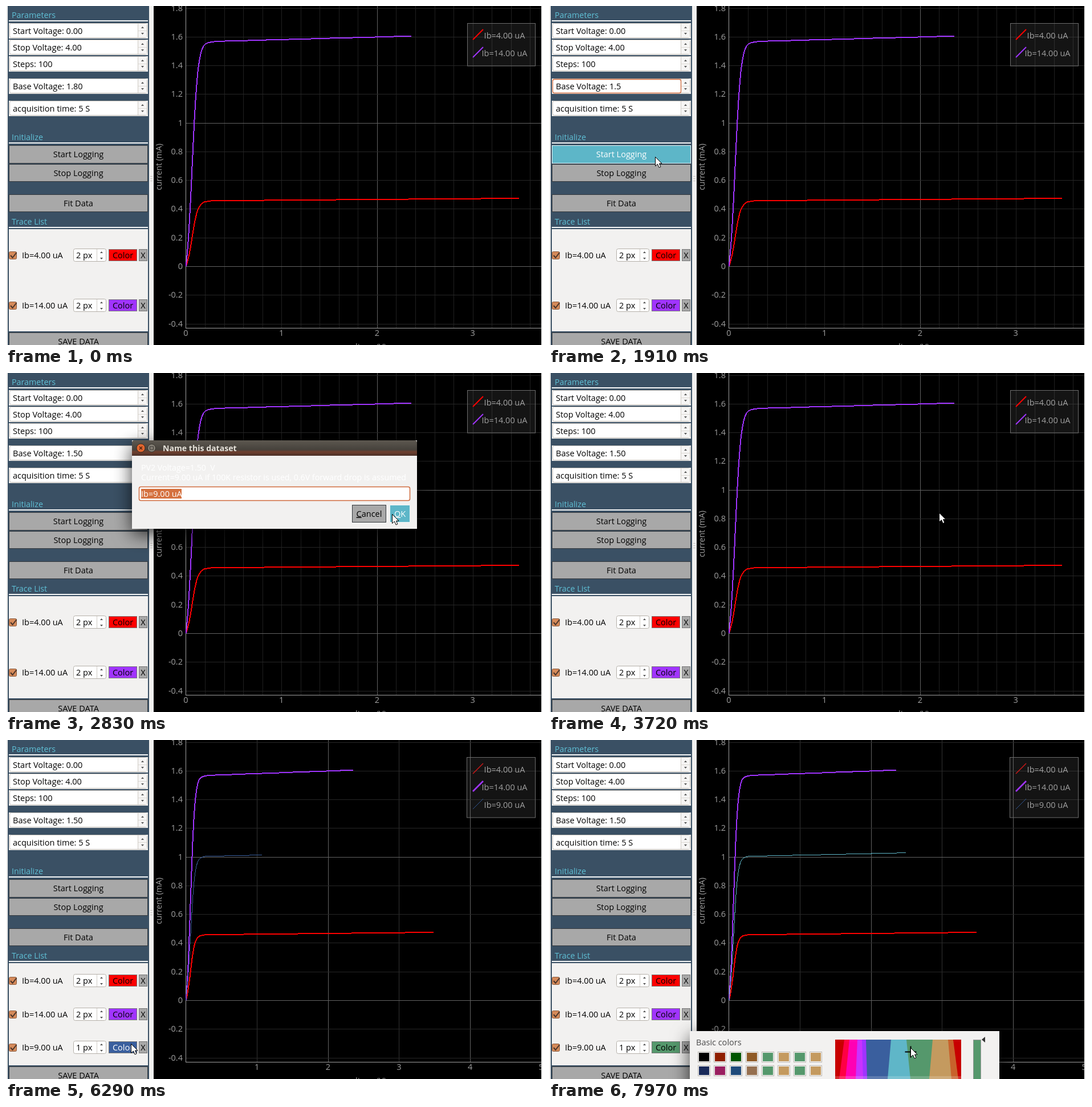
An HTML page that plays this animation: 942x594 px, repeating every 8 s.

```html
<!DOCTYPE html>
<html lang="en">
<head>
<meta charset="utf-8">
<title>Transistor curve logger</title>
<style>
  html, body { margin: 0; width: 100%; height: 100%; overflow: hidden; background: #000; }
  svg { display: block; width: 942px; height: 594px; font: 14.5px "Open Sans", sans-serif; }
  text { white-space: pre; }
  .mid { text-anchor: middle; }
  .end { text-anchor: end; }
  .head { fill: #5fc0d6; font-size: 14.3px; }
  .axis { fill: #a0a0a0; }
  .small { font-size: 14.2px; }
  .crisp { shape-rendering: crispEdges; }
  .btn rect { fill: #a8a8a8; stroke: #35393d; }
  .btn.hot rect { fill: #5db6c8; stroke: #e8f4f6; }
  .btn.hot text, .swatch.hot text { fill: #fff; }
</style>
</head>
<body>
<svg id="stage" viewBox="0 0 942 594">
  <defs>
    <linearGradient id="bar" x2="0" y2="1">
      <stop offset="0" stop-color="#5d5850"/><stop offset=".6" stop-color="#46423c"/>
      <stop offset=".75" stop-color="#70402f"/><stop offset="1" stop-color="#4a3028"/>
    </linearGradient>
    <filter id="shadow" x="-20%" y="-60%" width="140%" height="240%">
      <feDropShadow dx="0" dy="10" stdDeviation="16" flood-color="#000" flood-opacity=".75"/>
    </filter>
    <clipPath id="plotClip"><path d="M259 0H939V594H259z"/></clipPath>
    <clipPath id="pickClip"><path d="M502 525H723V594H502z"/></clipPath>
  </defs>
</svg>
<script>
const LOOP = 8000, Y0 = 456, YS = 251.3, X0 = 315.5;
const RED = '#ff0000', PURPLE = '#a034ff', BLUE = '#3a5f9e', CYAN = '#5fb6c8',
      GREEN = '#55986c', TAN = '#c49a5f', PALE = '#f2f1f0';
const $ = id => document.getElementById(id);

// --- drawing helpers -------------------------------------------------
const rect = (x, y, w, h, fill, more = '') =>
  `<rect x="${x}" y="${y}" width="${w}" height="${h}" fill="${fill}" ${more}/>`;
const text = (x, y, s, more = '') => `<text x="${x}" y="${y}" ${more}>${s}</text>`;
const line = (x1, y1, x2, y2, c, w = 1) =>
  `<path class="crisp" d="M${x1} ${y1}L${x2} ${y2}" stroke="${c}" stroke-width="${w}"/>`;
const group = (id, body, more = '') => `<g id="${id}" ${more}>${body}</g>`;
const button = (id, x, y, w, h, s) =>
  group(id, rect(x + .5, y + .5, w - 1, h - 1, '') +
    text(x + w / 2, y + h / 2 + 5, s, 'class="mid"'), 'class="btn"');

function arrows(x, y, gap) {
  return `<path d="M${x - 2.5} ${y - gap + 1}l2.5 -3l2.5 3zM${x - 2.5} ${y + gap - 1}l2.5 3l2.5 -3z" fill="#555"/>`;
}
function field(y, label, id = '') {
  return rect(5, y, 244, 27, PALE) +
    rect(6.5, y + .5, 241, 25, '#fff', 'rx="3" stroke="#c4bfb8"') +
    rect(232, y + 1, 15, 24, '#f6f5f4') + line(231.5, y + 1, 231.5, y + 25, '#cfcbc5') +
    line(232, y + 13.5, 247, y + 13.5, '#dedbd6') + arrows(239.5, y + 13, 5) +
    text(12, y + 19, label, id && `id="${id}"`);
}
function heading(y, s) {
  return text(10, y, s, 'class="head"') + rect(5, y + 4, 244, 2, '#f4f6f7');
}
function traceRow(y, name, px, color, id = '') {
  return rect(5.5, y - 6.5, 13, 13, '#d58a5a', 'rx="2" stroke="#8a5a3c"') +
    `<path d="M8 ${y}l3.5 4l7 -9" fill="none" stroke="#4a352a" stroke-width="2"/>` +
    text(28, y + 5, name) +
    rect(118.5, y - 11.5, 57, 22, '#fff', 'rx="3" stroke="#b5b0a9"') +
    line(159.5, y - 11, 159.5, y + 10, '#cfcbc5') + arrows(167.5, y, 5) + text(123, y + 5, px + ' px') +
    group(id, rect(180.5, y - 10.5, 49, 20, color, 'stroke="#777"') +
      text(205, y + 5, 'Color', 'class="mid"'), 'class="swatch"') +
    rect(233.5, y - 10.5, 14, 20, '#a8a8a8', 'stroke="#777"') + text(240.5, y + 5, 'X', 'class="mid"');
}

// --- transistor curves ----------------------------------------------
function current(v, sat, slope) {
  const e = Math.exp(-v / .03);
  return (sat + slope * v) * (1 - e) / (1 + 9 * e);
}
// The load takes 1 V per mA, so solve v + i(v) = supply at each step.
function curve(sat, slope, supply, scale) {
  const pts = [];
  for (let n = 0; n <= Math.round(supply / .04); n++) {
    let lo = 0, hi = n * .04;
    for (let k = 0; k < 22; k++) {
      const m = (lo + hi) / 2;
      if (m + current(m, sat, slope) > n * .04) hi = m; else lo = m;
    }
    const i = Math.round(current(lo, sat, slope) * 250) / 250;
    pts.push((X0 + lo * scale).toFixed(1) + ',' + (Y0 - i * YS).toFixed(1));
  }
  return pts.join(' ');
}
const trace = (pts, color, w, id = '') =>
  `<polyline class="crisp" id="${id}" points="${pts}" fill="none" stroke="${color}" stroke-width="${w}"/>`;

function plot(id, scale, step, ticks) {
  let s = '';
  for (let k = 1; X0 + k * step * scale < 939; k++) {
    const v = k * step, x = Math.round(X0 + v * scale) + .5;
    const major = Math.abs(v % 2) < .01 || v % 2 > 1.99;
    s += line(x, 0, x, 564, major ? '#626262' : step < 1 ? '#202020' : '#333');
  }
  for (let k = -2; k <= 9; k++) {
    const y = Math.round(Y0 - k * .2 * YS) + .5;
    s += line(316, y, 939, y, k % 5 ? '#262626' : '#626262');
    s += text(310, y + 4.5, +(k * .2).toFixed(1), 'class="axis end"');
  }
  s += line(315.5, 0, 315.5, 565, '#a0a0a0') + line(315, 564.5, 939, 564.5, '#a0a0a0');
  for (const v of ticks) s += text(X0 + v * scale, 578, v, 'class="axis mid"');
  s += trace(curve(.4538, .0053, 3.96, scale), RED, 2) + trace(curve(1.5625, .018, 3.96, scale), PURPLE, 2);
  return group(id, s);
}
function legend(x, rows) {
  return rect(x, 30.5, 928.5 - x, 12.5 + rows.length * 31, '#646464', 'fill-opacity=".2" stroke="#6c6c6c"') +
    rows.map(([name, color, w], k) =>
      `<path d="M819 ${59 + k * 31}l18 -18" stroke="${color}" stroke-width="${w}"/>` +
      text(874.5, 57 + k * 31, name, 'class="axis mid"')).join('');
}

const names = ['Ib=4.00 uA', 'Ib=14.00 uA', 'Ib=9.00 uA'];

const panel = rect(0, 0, 942, 594, PALE) + rect(3, 0, 248, 594, '#3a5064') +
  heading(21, 'Parameters') + field(30, 'Start Voltage: 0.00') + field(59, 'Stop Voltage: 4.00') +
  field(88, 'Steps: 100') + field(127, '', 'base') + field(166, 'acquisition time: 5 S') +
  rect(6.5, 128.5, 225, 24, 'none', 'id="focus" rx="3" stroke="#cf6a3c" stroke-width="1.3"') +
  group('caret', line(134.5, 132, 134.5, 149, '#000')) +
  heading(235, 'Initialize') + button('start', 5, 244, 244, 32, 'Start Logging') +
  button('stop', 5, 277, 244, 31, 'Stop Logging') + button('fit', 5, 330, 244, 31, 'Fit Data') +
  heading(383, 'Trace List') + rect(5, 391, 244, 179, PALE) +
  group('listA', traceRow(437, names[0], 2, RED) + traceRow(525, names[1], 2, PURPLE)) +
  group('listB', traceRow(422, names[0], 2, RED) + traceRow(481, names[1], 2, PURPLE) +
    traceRow(539, names[2], 1, BLUE, 'pick')) +
  button('save', 5, 572, 244, 32, 'SAVE DATA') +
  [0, 1, 2].map(k => rect(253, 298 + k * 4, 4, 1, '#c8c4bf')).join('');

const graph = rect(259, 0, 680, 594, '#000') +
  plot('plotA', 167.7, .2, [0, 1, 2, 3]) + plot('plotB', 124.65, 1, [1, 2, 3, 4, 5]) +
  trace('', BLUE, 1, 'live') +
  group('legendA', legend(809.5, [[names[0], RED, 2], [names[1], PURPLE, 2]])) +
  group('legendB', legend(808.5, [[names[0], '#d01818', 1.4], [names[1], PURPLE, 2.6], [names[2], '#2f5590', 1]])) +
  text(0, 0, 'current (mA)', 'class="axis mid" font-size="14" transform="translate(273 282) rotate(-90)"') +
  text(632, 602, 'voltage (V)', 'class="axis mid"') +
  rect(259.5, 591.5, 12, 12, '#222', 'id="auto" rx="3" stroke="#999"');

const nameBox = rect(221, 118, 500, 155, PALE, 'filter="url(#shadow)"') +
  `<path d="M221 145V122q0 -4 4 -4H717q4 0 4 4V145z" fill="url(#bar)"/>` +
  `<circle cx="236.5" cy="131.5" r="7.5" fill="#e2662f" stroke="#3a2a20"/>` +
  `<path d="M234 129l5 5m0 -5l-5 5" stroke="#4a2413" stroke-width="1.5"/>` +
  `<circle cx="255.5" cy="131.5" r="7" fill="#837e74" stroke="#33302b"/>` +
  rect(252.5, 129, 6, 5, 'none', 'stroke="#3a3732"') +
  text(275, 137, 'Name this dataset', 'fill="#e6e2da" font-weight="700" font-size="14.1"') +
  text(237, 171, 'PV2 Voltage=1.50  V', 'class="small" fill="#fff"') +
  text(237, 188, 'Current=9.00 uA if 100K resistor is used, 0.6V forward drop is assumed', 'class="small" fill="#fff"') +
  rect(233.5, 199.5, 475, 24, '#fff', 'id="entry" rx="3" stroke-width="1.5"') +
  rect(237, 203, 71, 17, '#d5713f') + text(237, 217, names[2], 'fill="#fff"') +
  group('entryCaret', line(308.5, 203, 308.5, 220, '#000')) +
  button('cancel', 607, 231, 60, 31, '<tspan text-decoration="underline">C</tspan>ancel') +
  button('ok', 673, 231, 36, 31, '<tspan text-decoration="underline">O</tspan>K');

// Hue stripes: left edge at the top, left edge at the bottom, colour.
const stripes = [[502, 502, '#c80000'], [518, 509, '#ff0044'], [527, 520, '#ff00b4'], [541, 538, '#c832ff'],
  [549, 551, PURPLE], [556, 558, BLUE], [600, 594, CYAN], [627, 634, GREEN], [673, 667, TAN],
  [700, 706, '#c8622c'], [709, 718, '#c80000']];
const swatches = ['#000', '#8f1f00', '#005500', '#8f5a26', GREEN, TAN, GREEN, TAN,
  '#1a2a5a', '#9a1f60', '#1f4a7a', '#967050', GREEN, TAN, GREEN, TAN];
const colorBox = rect(247, 510, 543, 200, PALE, 'filter="url(#shadow)"') +
  text(258, 535, 'Basic colors', 'fill="#4a4a4a"') +
  swatches.map((c, k) => {
    const x = 262 + k % 8 * 28, y = 547 + (k >> 3) * 24;
    return rect(x - .5, y - .5, 21, 18, '#fff', 'stroke="#b8b4ae"') + rect(x + 1, y + 1, 18, 15, c);
  }).join('') +
  `<g clip-path="url(#pickClip)">` +
  stripes.map(([a, b, c]) => `<path d="M${a} 525H723V594H${b}z" fill="${c}"/>`).join('') +
  rect(502, 589, 221, 5, '#fff', 'opacity=".18"') +
  `<path id="cross" d="M-10 0H10M0 -10V10" stroke="#000" stroke-width="2"/></g>` +
  rect(744.5, 525.5, 13, 80, BLUE, 'id="value" stroke="#999"') +
  `<path d="M759 525l6 -5v10z" fill="#333"/>`;

$('stage').insertAdjacentHTML('beforeend', panel +
  `<g clip-path="url(#plotClip)">${graph}</g>` + group('nameBox', nameBox) + group('colorBox', colorBox) +
  `<path id="mouse" d="M0 0V16L4 12.5L6.6 18.5L9.4 17.3L7 11.6H11.6z" fill="#fff" stroke="#000"/>`);
$('ok').classList.add('hot');

// --- timeline --------------------------------------------------------
const path = [[450, 134, 132], [550, 224, 166], [1440, 224, 166], [1660, 214, 300], [1860, 186.5, 264.5],
  [2450, 186.5, 264.5], [2800, 677.5, 247.5], [2850, 677.5, 247.5], [3000, 684.5, 245], [4000, 684.5, 245],
  [4250, 695, 330], [4720, 560, 600], [5400, 394, 600], [5860, 306, 572], [6250, 219.5, 532.5],
  [6760, 219.5, 532.5], [7100, 400, 562], [7500, 562, 548], [7970, 634.5, 539.5]];

function mouseAt(t) {
  let k = 0;
  while (k < path.length - 2 && t > path[k + 1][0]) k++;
  const [a, ax, ay] = path[k], [b, bx, by] = path[k + 1];
  const p = Math.min(1, Math.max(0, (t - a) / (b - a)));
  return [ax + (bx - ax) * p, ay + (by - ay) * p];
}
function pickedAt(t) {
  if (t < 7550) return BLUE;
  const [x, y] = mouseAt(t), p = (y + 8 - 525) / 69;
  return stripes.reduce((c, [a, b, col]) => x >= a + (b - a) * p ? col : c, BLUE);
}
const show = (id, on) => $(id).style.display = on ? '' : 'none';
const fade = (id, p) => { show(id, p > 0); $(id).style.opacity = Math.min(1, p); };
const hot = (id, on) => $(id).classList.toggle('hot', on);

let shown = '';
function render(t) {
  const [x, y] = mouseAt(t), second = t >= 3790;
  const over = (x1, y1, x2, y2) => t >= 450 && x >= x1 && x < x2 && y >= y1 && y < y2;

  $('base').textContent = 'Base Voltage: ' + (t < 940 ? '1.80' : t < 2100 ? '1.5' : '1.50');
  show('focus', t >= 60 && t < 2100);
  show('caret', t >= 110 && t < 500);
  hot('start', t < 2330 && over(5, 244, 249, 276));
  hot('stop', t < 2330 && over(5, 277, 249, 308));
  hot('pick', t < 6730 && over(180, 528, 230, 549));

  for (const id of ['plot', 'legend', 'list']) {
    show(id + 'A', !second);
    show(id + 'B', second);
  }
  show('auto', second && t < 6000);

  fade('nameBox', t < 3720 ? (t - 2330) / 150 : 0);
  show('entryCaret', t >= 3220 && t < 3560);
  $('entry').setAttribute('stroke', t < 3560 ? '#cf6a3c' : '#b5b0a9');

  const clock = t > 4870 && t < 5070 ? 4870 : t;
  const supply = second ? Math.max(0, Math.floor((clock - 3840) * .000855 / .04 + .01) * .04) : 0;
  const pts = curve(1, .011, supply, 124.65);
  if (pts !== shown) $('live').setAttribute('points', shown = pts);
  $('live').setAttribute('stroke', pickedAt(t - 120));

  fade('colorBox', (t - 6730) / 180);
  const color = pickedAt(t);
  $('pick').firstChild.setAttribute('fill', color);
  $('value').setAttribute('fill', color);
  show('cross', t >= 7550);
  $('cross').setAttribute('transform', `translate(${x} ${y + 7})`);

  show('mouse', t >= 450);
  $('mouse').setAttribute('transform', `translate(${x} ${y})`);
}
function tick() {
  render(performance.now() % LOOP);
  requestAnimationFrame(tick);
}
tick();
</script>
</body>
</html>
```
